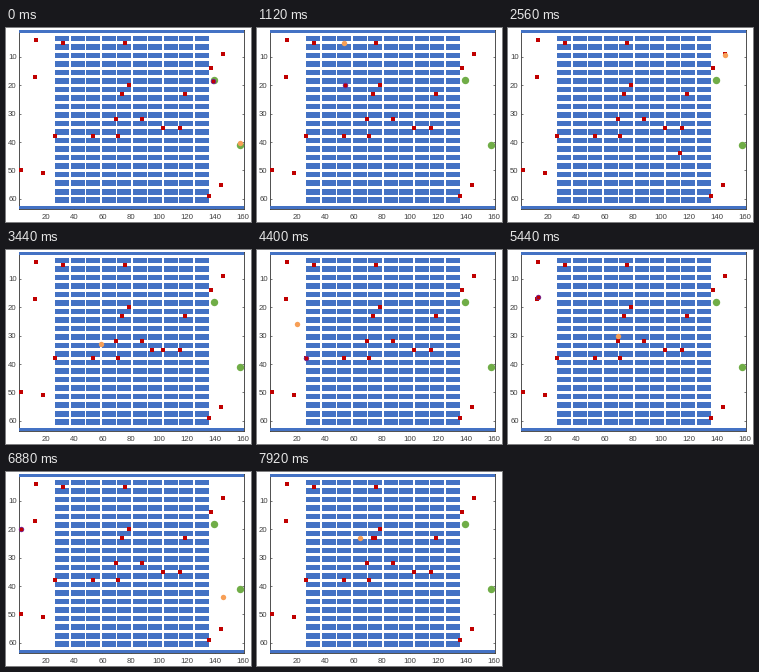
Recreate the animation shown at these times as a matplotlib script. Size 245 by 194 pixels, loop 8000 ms.

```python
import numpy as np
import matplotlib.pyplot as plt
from matplotlib.animation import FuncAnimation
from matplotlib.patches import Rectangle

WIDTH, HEIGHT, DPI = 245, 194, 100
FRAMES, INTERVAL = 100, 80
CELLS_PER_FRAME = 10
PX = 72 / DPI  # points per pixel

BLUE, RED, GREEN = "#4472c4", "#c00000", "#70ad47"
ORANGE, PURPLE, INK = "#f79f56", "#7b1f80", "#404040"

LEFT_HALL, RIGHT_HALL = 26, 136
GAPS = range(LEFT_HALL, RIGHT_HALL + 1, 11)

ITEMS = [(13, 4), (32, 5), (76, 5), (146, 9), (137, 14), (12, 17), (79, 20),
         (74, 23), (119, 23), (70, 32), (88, 32), (103, 35), (115, 35),
         (26, 38), (53, 38), (71, 38), (2, 50), (18, 51), (144, 55), (136, 59)]
DEPOTS = [(139, 18), (158, 41)]

# Each leg of a tour: index of the item to visit, aisle used to cross the racks.
ORANGE_TOUR = [(0, 5), (3, 8), (14, 32), (6, 20), (16, 20), (9, 38), (6, 20),
               (2, 5), (19, 32), (3, 8), (1, 23)]
PURPLE_TOUR = [(10, 20), (2, 5), (5, 20), (15, 17), (11, 35), (18, 44), (10, 35),
               (17, 38), (9, 38), (5, 14), (0, 5), (2, 11), (0, 5), (16, 5), (8, 23)]
CARRYING_LEGS = {4, 5, 6, 7, 14}


def hall(point):
    """Rack edge next to a point in an open hall, None between the racks."""
    if point[0] <= LEFT_HALL:
        return LEFT_HALL
    return RIGHT_HALL if point[0] >= RIGHT_HALL else None


def stairs(a, b):
    """Diagonal staircase first, then straight on."""
    delta = np.subtract(b, a)
    corner = a + np.sign(delta) * np.abs(delta).min()
    return [a, tuple(corner), b]


def through_gap(point, aisle, other):
    """Way from a point between the racks to an aisle by the handiest gap."""
    x, y = point
    if y == aisle:
        return [point]
    gap = min(GAPS, key=lambda g: (abs(x - g) + abs(g - other[0]), abs(x - g)))
    return [point, (gap, y), (gap, aisle)]


def leg(start, goal, aisle):
    out_of, into = hall(start), hall(goal)
    if out_of and out_of == into:
        return stairs(start, goal)
    way = (stairs(start, (out_of, aisle)) if out_of
           else through_gap(start, aisle, goal))
    return way + (stairs((into, aisle), goal) if into
                  else through_gap(goal, aisle, start)[::-1])


def plan(depot, tour):
    """Return position(step) and the step at which each leg ends."""
    points, leg_ends = [depot], []
    for item, aisle in tour:
        points += leg(points[-1], ITEMS[item], aisle)
        leg_ends.append(len(points) - 1)
    points = np.array(points, float)
    steps = np.abs(np.diff(points, axis=0)).sum(axis=1)
    travelled = np.concatenate([[0], np.cumsum(steps)])

    def position(step):
        return [np.interp(step, travelled, axis) for axis in points.T]
    return position, travelled[leg_ends]


def marker(points, shape, size, color, z):
    xs, ys = zip(*points)
    return ax.plot(xs, ys, shape, ms=size * PX, color=color, mew=0,
                   zorder=z, clip_on=False)[0]


def block(x, y, width, height, z=1):
    ax.add_patch(Rectangle((x, y), width, height, facecolor=BLUE,
                           linewidth=0, zorder=z))


fig = plt.figure(figsize=(WIDTH / DPI, HEIGHT / DPI), dpi=DPI, facecolor="white")
left, right, top, bottom = 12.7, 237.8, 1.9, 180.7
ax = fig.add_axes([left / WIDTH, 1 - bottom / HEIGHT,
                   (right - left) / WIDTH, (bottom - top) / HEIGHT])
ax.set(xlim=(0.5, 160.5), ylim=(63.5, 0.5),
       xticks=range(20, 161, 20), yticks=range(10, 61, 10))
ax.tick_params(direction="in", top=True, right=True, length=2 * PX,
               width=0.7 * PX, color=INK)
ax.tick_params(axis="x", pad=5 * PX)
ax.tick_params(axis="y", pad=2 * PX)
for label in ax.get_xticklabels() + ax.get_yticklabels():
    label.set(fontname="Liberation Sans", fontsize=7.8 * PX, color=INK)
for spine in ax.spines.values():
    spine.set(linewidth=0.9 * PX, color=INK)

for y in (0.5, 62.5):
    block(0.5, y, 160, 1, z=2.6)
for row in range(20):
    for gap in GAPS[:-1]:
        block(gap + 0.5, 2.5 + 3 * row, 10, 2)

marker(DEPOTS, "o", 7.4, GREEN, 3)
marker(ITEMS, "s", 4.4, RED, 4)

purple_at, purple_ends = plan(DEPOTS[0], PURPLE_TOUR)
orange_at, _ = plan(DEPOTS[1], ORANGE_TOUR)
orange = marker(DEPOTS[1:], "o", 5.4, ORANGE, 6)
purple = marker(DEPOTS[:1], "o", 5.4, PURPLE, 5)
core = marker(DEPOTS[:1], "s", 3, RED, 5.5)


def update(frame):
    step = 1 + CELLS_PER_FRAME * frame
    x, y = orange_at(step)
    orange.set_data([x], [y])
    x, y = purple_at(step)
    carrying = np.searchsorted(purple_ends, step) in CARRYING_LEGS
    purple.set_visible(not carrying)
    core.set_markersize((4.4 if carrying else 3) * PX)
    for part in (purple, core):
        part.set_data([x], [y])
    return orange, purple, core


anim = FuncAnimation(fig, update, frames=FRAMES, interval=INTERVAL,
                     repeat=True, repeat_delay=0, blit=False)
plt.show()
```
